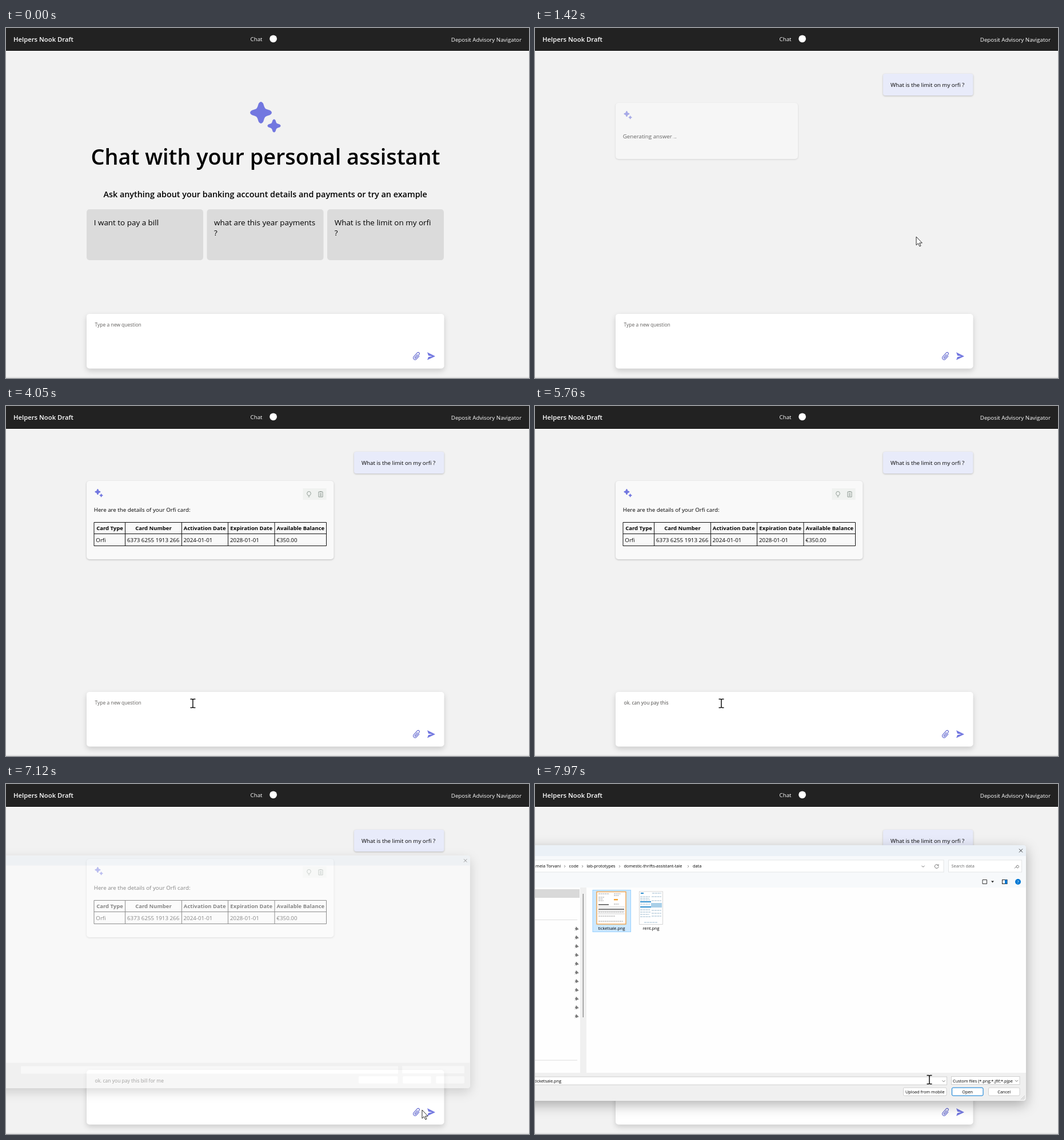
An HTML page that plays this animation: 915x612 px, repeating every 7990 ms.

```html
<!DOCTYPE html>
<html lang="en">
<head>
<meta charset="utf-8">
<title>Personal assistant chat</title>
<style>
  html, body { margin: 0; width: 100%; height: 100%; overflow: hidden; background: #f2f2f2; }
  svg { display: block; }
  text { font: 9.75px "Open Sans", "Noto Sans", sans-serif; white-space: pre; }
  .mid { text-anchor: middle; }
  .end { text-anchor: end; }
  .semi { font-weight: 600; }
  .title { font-size: 37.8px; }
  .sub { font-size: 14.36px; }
  .example text { font-size: 13.45px; }
  .input text { font-size: 8.5px; fill: #605e5c; }
  .th { font-size: 9.5px; font-weight: 700; }
  .accent { fill: #7277e0; }
  .soft { filter: drop-shadow(0 1px 1.5px rgba(0,0,0,.22)); }
  .lift { filter: drop-shadow(0 4px 5px rgba(0,0,0,.16)); }
  .window { filter: drop-shadow(0 7px 11px rgba(0,0,0,.3)); }
  .line { fill: none; stroke: #666; stroke-width: .9; }
  .field { fill: #fff; stroke: #d0d0d0; }
  .blue { stroke: #0078d4; }
  .loading .field { stroke: none; }
  .loading #content { display: none; }
  #dialog text { font-size: 7.35px; }
</style>
</head>
<body>
<svg width="915" height="612" viewBox="0 0 915 612">
  <defs>
    <path id="star" d="M-4-16Q0-22 4-16L6-10Q7-7 10-6L16-4Q22 0 16 4L10 6Q7 7 6 10L4 16Q0 22-4 16L-6 10Q-7 7-10 6L-16 4Q-22 0-16-4L-10-6Q-7-7-6-10Z"/>
    <g id="sparkle" class="accent">
      <use href="#star" x="19" y="19"/>
      <use href="#star" transform="translate(42 42) scale(.61)"/>
    </g>
    <path id="pin" d="M-1-3.2L3.2 1 1 1.3-.3 3-3-.3-1.3-1ZM-1.4 1.4L-3.3 3.3" fill="#777" stroke="#777" stroke-width=".7"/>
    <path id="chevron" class="line" d="M-2.5-1.2L0 1.3 2.5-1.2"/>
  </defs>

  <rect width="915" height="612" fill="#f2f2f2"/>
  <rect width="915" height="40" fill="#222"/>
  <rect y="40" width="915" height="1.5" fill="#fff"/>
  <rect y="610.5" width="915" height="1" fill="#d8d8d8"/>
  <g fill="#fff">
    <text class="semi" x="13" y="23.7" style="font-size:11.3px">Helpers Nook Draft</text>
    <text x="427.5" y="23.2">Chat</text>
    <circle cx="467.6" cy="18.8" r="6.4"/>
    <text class="end" x="902" y="23.7">Deposit Advisory Navigator</text>
  </g>

  <g id="home">
    <use href="#sparkle" x="427" y="129"/>
    <text class="title semi mid" x="454" y="239">Chat with your personal assistant</text>
    <text class="sub semi mid" x="453.7" y="296">Ask anything about your banking account details and payments or try an example</text>
    <g class="example">
      <g fill="#dbdbdb">
        <rect x="141" y="317" width="204" height="89" rx="5"/>
        <rect x="351.5" y="317" width="204" height="89" rx="5"/>
        <rect x="562" y="317" width="204" height="89" rx="5"/>
      </g>
      <rect id="hover" class="lift" x="561.5" y="316.3" width="205.5" height="90" rx="5.5" fill="#dbdbdb" stroke="#7277e0" stroke-width="1.4"/>
      <text x="153.7" y="344.6">I want to pay a bill</text>
      <text x="364" y="344.6">what are this year payments</text>
      <text x="364" y="363.3">?</text>
      <text x="574.7" y="344.6">What is the limit on my orfi</text>
      <text x="574.7" y="363.3">?</text>
    </g>
  </g>

  <g id="chat">
    <rect class="soft" x="609" y="80" width="157.5" height="38" rx="4" fill="#e8ebfa"/>
    <text x="622" y="102.7">What is the limit on my orfi ?</text>
    <g id="waiting">
      <rect class="soft" x="141" y="131" width="319" height="98" rx="5" fill="#f9f9f9"/>
      <text x="153.7" y="192.8">Generating answer<tspan class="dot">.</tspan><tspan class="dot">.</tspan><tspan class="dot">.</tspan></text>
      <use href="#sparkle" transform="translate(155.3 145) scale(.27)"/>
    </g>
    <g id="answer">
      <rect class="soft" x="141" y="131" width="432.5" height="137" rx="5" fill="#f9f9f9"/>
      <use href="#sparkle" transform="translate(155.3 145) scale(.27)"/>
      <rect x="519.5" y="144" width="41" height="20" fill="#f0f2f0"/>
      <g fill="none" stroke="#8f9b94">
        <path d="M528.4 156.5Q526.7 154.5 526.7 152.8A3.3 3.3 0 0 1 533.3 152.8Q533.3 154.5 531.6 156.5ZM528.6 158.7H531.4"/>
        <path d="M547 150H554V159H547ZM549 149.5H552M549 153H552M549 155H552M549 157H552"/>
      </g>
      <text x="153.7" y="185">Here are the details of your Orfi card:</text>
      <path d="M154 203.5H560.5V244.5H154ZM154 223.5H560.5M208.5 203.5V244.5M307.5 203.5V244.5M388.5 203.5V244.5M470 203.5V244.5" fill="none" stroke="#111"/>
      <g class="mid">
        <text class="th" x="181.5" y="217">Card Type</text>
        <text class="th" x="258" y="217">Card Number</text>
        <text class="th" x="347.7" y="217">Activation Date</text>
        <text class="th" x="429.2" y="217">Expiration Date</text>
        <text class="th" x="515.3" y="217">Available Balance</text>
      </g>
      <text x="157.3" y="238">Orfi</text>
      <text x="212" y="238">6373 6255 1913 266</text>
      <text x="310.5" y="238">2024-01-01</text>
      <text x="392" y="238">2028-01-01</text>
      <text x="473.3" y="238">€350.00</text>
    </g>
  </g>

  <g class="input">
    <rect class="lift" x="141" y="500" width="625.5" height="95.5" rx="5" fill="#fff"/>
    <text id="entry" x="155.5" y="522"></text>
    <rect id="caret" y="513" width=".8" height="11.5" fill="#222"/>
    <path d="M3.2-3V4A3.2 3.2 0 0 1-3.2 4V-5A2.2 2.2 0 0 1 1.2-5V3.5A1 1 0 0 1-.9 3.5V-3" transform="translate(718.5 573.8) rotate(42)" fill="none" stroke="#6167cf" stroke-width="1.1" stroke-linecap="round"/>
    <path class="accent" d="M737 567L751 574 737 580.5 739 575.2 746 574 739 572.8Z"/>
  </g>

  <g id="dialog">
    <rect class="window" x="-100" y="107" width="959" height="447" rx="5" fill="#fefefe"/>
    <path d="M-100 126V112Q-100 107-95 107H854Q859 107 859 112V126Z" fill="#ebf1f7"/>
    <path d="M-100 505H859V549Q859 554 854 554H-100Z" fill="#f0f0f0"/>
    <path class="line" d="M847 113.5L853 119.5M853 113.5L847 119.5" style="stroke:#222"/>
    <rect id="nameField" class="field" x="-5" y="512" width="725.5" height="14"/>
    <rect class="field" x="728.5" y="511.5" width="119.5" height="14"/>
    <rect class="field" x="644.5" y="531" width="75.5" height="14" rx="2"/>
    <rect class="field blue" x="729.5" y="531" width="54.5" height="14" rx="2"/>
    <rect class="field" x="793.5" y="531" width="54.5" height="14" rx="2"/>
    <g id="content">
      <rect y="126" width="859" height="55" fill="#f7f9fb"/>
      <rect class="field" x="-5" y="133" width="720" height="21" style="stroke:#e3e5e7"/>
      <rect class="field" x="723.5" y="133" width="128" height="21" style="stroke:#e3e5e7"/>
      <text class="end" x="45" y="146.3">mela Torvani</text>
      <text x="59.5" y="146.3">code</text>
      <text x="90.5" y="146.3">lab-prototypes</text>
      <text x="155.5" y="146.3">domestic-thrifts-assistant-tale</text>
      <text x="276" y="146.3">data</text>
      <g id="crumbs"></g>
      <use href="#chevron" x="679" y="144"/>
      <path class="line" d="M705 141.7A3.3 3.3 0 1 0 706 144M706 140.5V142.5H704"/>
      <text x="728.5" y="146.3" fill="#666">Search data</text>
      <path class="line" d="M842 144.5L839 147.5M842 144.5A2.2 2.2 0 1 0 842 144.4"/>
      <path class="line" d="M783 167.5H790.5V174.5H783Z" style="stroke:#222"/>
      <path d="M798 169.5H803L800.5 172.5Z" fill="#222"/>
      <rect x="817.5" y="167.5" width="8.5" height="7" fill="#fff" stroke="#222"/>
      <rect x="822" y="167.5" width="4" height="7" fill="#0078d4"/>
      <circle cx="845" cy="171" r="5" fill="#0078d4"/>
      <text class="mid" x="845" y="173.7" fill="#fff">?</text>

      <rect y="184" width="78" height="15" fill="#d9d9d9"/>
      <path d="M0 237.5H74M0 483H74" stroke="#ddd"/>
      <g id="pins"></g>
      <rect x="79" y="181" width="11" height="324" fill="#f0f0f0"/>
      <path d="M84.3 192V408" stroke="#858585" stroke-width="1.3"/>

      <rect id="file1" x="101" y="185.5" width="66.5" height="73"/>
      <rect id="file2" x="170" y="185.5" width="66.5" height="73"/>
      <rect x="108" y="188.5" width="51" height="56.5" fill="#fff" stroke="#f0a24a" stroke-width="1.4"/>
      <path d="M111 192H130M138 192H150M111 198H121M111 201H119M111 204H120M138 195H147M138 210H147M111 224H156M111 231H140M111 240H154" stroke="#888" stroke-width=".8" stroke-dasharray="3 .7"/>
      <path d="M111 211H129M111 219H156" stroke="#777" stroke-width="2.2"/>
      <path d="M110 215H157M110 222H157M110 227H157" stroke="#ccc"/>
      <rect x="138" y="201" width="7" height="2.4" fill="#f5a02c"/>
      <rect x="182.5" y="188" width="41" height="57.5" fill="#fff" stroke="#ccc" stroke-width=".8"/>
      <path d="M185 191H190M184 206H203M184 215H203" stroke="#2f8fd0" stroke-width="2"/>
      <rect x="203" y="208" width="19" height="8" fill="#a9cfe8"/>
      <path d="M205 191H221M184 197H201M184 200H200M184 203H201M204 197H221M204 204H221M184 210H201M184 220H201M184 224H202M184 228H200M184 232H202M204 221H221M204 226H221M204 231H221M191 242H214" stroke="#8fb2c9" stroke-width=".9" stroke-dasharray="4 .8"/>
      <text class="mid" x="134" y="255.3">ticketsale.png</text>
      <text class="mid" x="203" y="255.3">rent.png</text>

      <text id="fileName" class="end" x="46" y="521.8">ticketsale.png</text>
      <use href="#chevron" x="715" y="519.5"/>
      <svg x="729" y="511" width="107" height="15"><text x="2" y="10.5">Custom files (*.png;*.jfif;*.pjpeg;*.jpeg)</text></svg>
      <use href="#chevron" x="842.5" y="519"/>
      <g class="mid">
        <text x="682.3" y="540.7">Upload from mobile</text>
        <text x="756.7" y="540.7">Open</text>
        <text x="820.7" y="540.7">Cancel</text>
      </g>
      <path class="line" d="M850 552L857 545M853 552L857 548" style="stroke:#bbb"/>
    </g>
  </g>

  <g id="pointer">
    <circle id="click" r="12" fill="#ecea62" fill-opacity=".9"/>
    <path id="arrow" d="M0 0V14.6L3.4 11.6 5.9 16.8 8 15.8 5.7 10.9H10.3Z" fill="#fff" stroke="#111" stroke-width=".9"/>
    <path id="beam" d="M-4.5-7.5H-1.2L0-6.5 1.2-7.5H4.5M-4.5 7.5H-1.2L0 6.5 1.2 7.5H4.5M0-6.5V6.5" fill="none" stroke="#111" stroke-width="1.5"/>
  </g>
</svg>
<script>
const LOOP = 7990;
const SENT = 1100, ANSWERED = 3450, OPENING = 7090, READY = 7190, SELECTED = 7480;
const CLICKS = [980, 4060, 6900, SELECTED];
const MESSAGE = "ok. can you pay this bill for me";
// Typing bursts: first key, interval, number of keys.
const BURSTS = [[4130, 80, 2], [4430, 55, 13], [5190, 35, 5], [5580, 0, 1], [5800, 42, 11]];
// Pointer stops: time, x, y.
const STOPS = [
  [300, 905, 622], [660, 667, 365], [3650, 667, 365], [3860, 480, 535], [4060, 326, 520],
  [6520, 326, 520], [6860, 718, 575], [7060, 718, 575], [7120, 728, 570], [7290, 169, 257],
  [7350, 169, 257], [7450, 143, 238], [7800, 143, 238], [7970, 690, 517]
];
const KEYS = BURSTS.flatMap(([start, gap, n]) => Array.from({ length: n }, (_, i) => start + gap * i));

const $ = id => document.getElementById(id);
const show = (id, on) => { $(id).style.display = on ? "" : "none"; };
const clamp = v => Math.max(0, Math.min(1, v));
const within = (x, y, l, t, r, b) => x >= l && x < r && y >= t && y < b;
const dots = document.querySelectorAll(".dot");

$("crumbs").innerHTML = [52, 83, 148, 268]
  .map(x => `<use href="#chevron" transform="translate(${x} 144) rotate(-90) scale(.8)"/>`).join("");
$("pins").innerHTML = Array.from({ length: 11 }, (_, i) => `<use href="#pin" x="73" y="${253 + 15.3 * i}"/>`).join("");

function pointerAt(t) {
  const next = STOPS.findIndex(s => s[0] > t);
  if (next <= 0) return (next ? STOPS.at(-1) : STOPS[0]).slice(1);
  const [t0, x0, y0] = STOPS[next - 1], [t1, x1, y1] = STOPS[next];
  const p = (t - t0) / (t1 - t0), e = p * p * (3 - 2 * p);
  return [x0 + (x1 - x0) * e, y0 + (y1 - y0) * e];
}

function drawPointer(t, x, y) {
  const beam = t < 7050 ? within(x, y, 141, 505, 766, 556) : t > 7600 && within(x, y, 0, 511, 710, 527);
  $("pointer").setAttribute("transform", `translate(${x} ${y})`);
  show("arrow", !beam);
  show("beam", beam);
  show("click", CLICKS.some(c => t >= c && t < c + 120));
}

function drawChat(t, x, y) {
  show("home", t < SENT);
  show("hover", within(x, y, 562, 317, 766, 406));
  show("chat", t >= SENT);
  show("waiting", t < ANSWERED);
  show("answer", t >= ANSWERED);
  $("waiting").style.opacity = clamp((t - SENT) / 550);
  const wave = (t - 1800 + 820) / 820 % 1;
  dots.forEach((dot, i) => {
    dot.style.fillOpacity = clamp(Math.abs(wave - .5 - .15 * i) / .15);
  });
}

function drawInput(t) {
  const typed = KEYS.filter(k => k <= t), entry = $("entry");
  entry.textContent = typed.length ? MESSAGE.slice(0, typed.length) : "Type a new question";
  entry.style.fill = typed.length ? "#484644" : "";
  const caretOn = typed.length && (t - typed.at(-1)) % 320 < 160;
  show("caret", caretOn);
  if (caretOn) $("caret").setAttribute("x", 155.5 + entry.getComputedTextLength());
}

function drawDialog(t, x, y) {
  const p = clamp((t - OPENING) / (READY - OPENING)), e = 1 - (1 - p) ** 2;
  const dialog = $("dialog"), selected = t >= SELECTED;
  show("dialog", p > 0);
  dialog.setAttribute("class", t < READY ? "loading" : "");
  dialog.setAttribute("opacity", e);
  dialog.setAttribute("transform", `translate(338 309) scale(${.81 + .19 * e}) translate(-338 -309)`);
  const tint = (left, right) => within(x, y, left, 185, right, 259) ? "#e5f3ff" : "none";
  $("file1").setAttribute("fill", selected ? "#cce8ff" : tint(101, 168));
  $("file1").setAttribute("stroke", selected ? "#99d1ff" : "none");
  $("file2").setAttribute("fill", tint(168, 237));
  $("nameField").setAttribute("class", selected ? "field" : "field blue");
  show("fileName", selected);
}

function render(now) {
  const t = now % LOOP, [x, y] = pointerAt(t);
  drawChat(t, x, y);
  drawInput(t);
  drawDialog(t, x, y);
  drawPointer(t, x, y);
  requestAnimationFrame(() => render(performance.now()));
}
render(performance.now());
</script>
</body>
</html>
```
